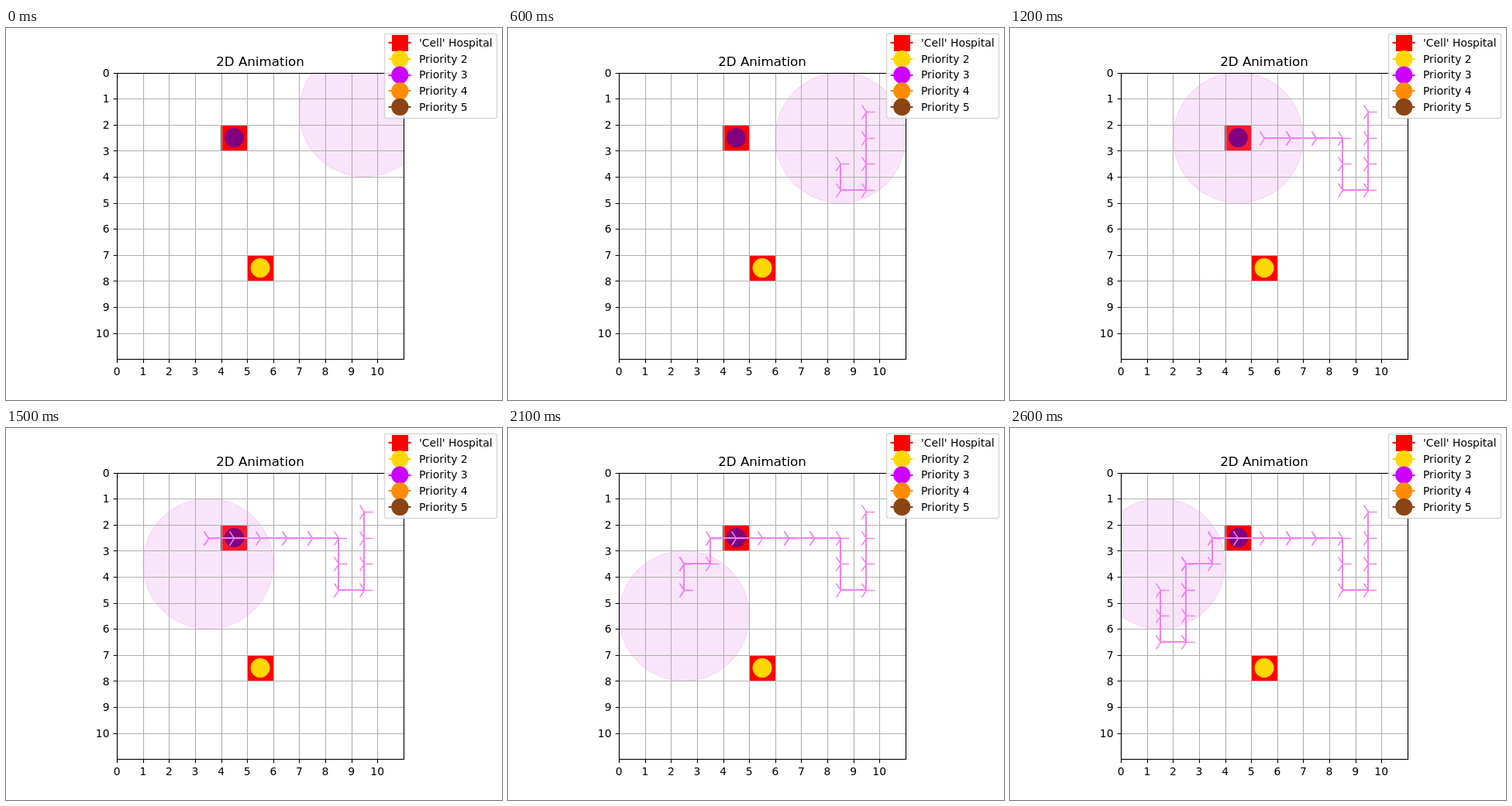
Recreate the animation shown at these times as an HTML page. Size 640 px wide and 480 px high, loop 2700 ms.

```html
<!DOCTYPE html>
<html lang="en">
<head>
<meta charset="utf-8">
<title>2D Animation</title>
<style>
  html, body { margin: 0; width: 100%; height: 100%; overflow: hidden; background: #fff; }
  svg { display: block; }
  text { font: 13.89px "DejaVu Sans", sans-serif; fill: #000; }
  .title { font-size: 16.67px; }
  .end { text-anchor: end; }
  .mid { text-anchor: middle; }
</style>
</head>
<body>
<svg id="stage" width="640" height="480" viewBox="0 0 640 480">
  <defs>
    <clipPath id="axes"><rect x="143.2" y="57.6" width="369.6" height="369.6"/></clipPath>
  </defs>
</svg>
<script>
const STEP = 100, CELL = 33.6, LEFT = 143.2, TOP = 57.6;
const stage = document.getElementById('stage');

function add(tag, attrs, parent = stage) {
  const el = document.createElementNS('http://www.w3.org/2000/svg', tag);
  for (const key in attrs) el.setAttribute(key, attrs[key]);
  parent.appendChild(el);
  return el;
}
function label(str, x, y, cls) {
  add('text', { x, y, class: cls || '' }).textContent = str;
}
const px = c => LEFT + CELL * c;
const py = c => TOP + CELL * c;
const snap = v => Math.round(v);

// One letter per step: direction of travel, or S to stay
const route = [[9, 1]];
const moves = { L: [-1, 0], R: [1, 0], U: [0, -1], D: [0, 1], S: [0, 0] };
for (const m of 'DDDLUULSLSLLLSDLDUSDDDLUUU') {
  const [x, y] = route[route.length - 1];
  route.push([x + moves[m][0], y + moves[m][1]]);
}
const points = route.map(([x, y]) => [px(x + 0.5), py(y + 0.5)]);

// Hospital cells and coverage disc
for (const [x, y] of [[4, 2], [5, 7]]) {
  add('rect', {
    x: snap(px(x)), y: snap(py(y)), width: snap(px(x + 1)) - snap(px(x)),
    height: snap(py(y + 1)) - snap(py(y)), fill: '#f00'
  });
}
const disc = add('circle', {
  r: 2.5 * CELL, fill: '#e17de1', stroke: '#e17de1', 'fill-opacity': 0.2,
  'stroke-opacity': 0.2, 'stroke-width': 1.39, 'clip-path': 'url(#axes)'
});

// Grid, ticks and tick labels
let grid = '', ticks = '';
for (let i = 0; i <= 10; i++) {
  const x = snap(px(i)) + 0.5, y = snap(py(i)) + 0.5;
  grid += `M${x} 58V427M143 ${y}H513`;
  ticks += `M${x} 427.5v4.86M143.5 ${y}h-4.86`;
  label(i, px(i), 448, 'mid');
  label(i, 133.5, py(i) + 5.2, 'end');
}
add('path', { d: grid, stroke: '#b0b0b0', 'stroke-width': 1.11 });
add('rect', { x: 277, y: 126, width: 1, height: 32, fill: '#3c4a4a' });

// Priority markers, then the trail
add('circle', { cx: px(4.5), cy: py(2.5), r: 12.5, fill: '#800080' });
add('circle', { cx: px(5.5), cy: py(7.5), r: 12.5, fill: '#ffd700' });
const trail = add('path', {
  fill: 'none', stroke: '#ee82ee', 'stroke-width': 2.08,
  'stroke-linejoin': 'round', 'stroke-linecap': 'square'
});
const marks = points.map(([x, y]) => {
  const c = `M${snap(x) + 0.5} ${snap(y) + 0.5}`;
  return add('path', {
    d: `${c}h11${c}l-6 -9${c}l-6 9`, fill: 'none', stroke: '#ee82ee', 'stroke-width': 1.39
  });
});

add('path', { d: ticks, stroke: '#000', 'stroke-width': 1.11 });
add('rect', {
  x: 143.5, y: 58.5, width: 370, height: 369, fill: 'none', stroke: '#000', 'stroke-width': 1.11
});
label('2D Animation', 328, 49, 'title mid');

// Legend
add('rect', {
  x: 488.5, y: 7.5, width: 145, height: 109, rx: 2.8, fill: '#fff', 'fill-opacity': 0.8,
  stroke: '#ccc', 'stroke-opacity': 0.8, 'stroke-width': 1.39
});
[["'Cell' Hospital", '#f00'], ['Priority 2', '#ffd700'], ['Priority 3', '#cc00ff'],
 ['Priority 4', '#ff8c00'], ['Priority 5', '#8b4513']].forEach(([name, fill], i) => {
  const y = 19.3 + 20.6 * i;
  add('path', { d: `M493.5 ${snap(y)}H522.5`, stroke: fill, 'stroke-width': 2.08 });
  if (i) add('circle', { cx: 508.3, cy: y + 0.2, r: 11.1, fill });
  else add('rect', { x: 498, y: 9, width: 21, height: 21, fill });
  label(name, 533, y + 4.86);
});

function draw(time) {
  const n = Math.floor(time / STEP) % points.length;
  disc.setAttribute('cx', points[n][0]);
  disc.setAttribute('cy', points[n][1]);
  const path = points.slice(0, n).map(([x, y]) => `${snap(x)} ${snap(y)}`);
  trail.setAttribute('d', n > 1 ? 'M' + path.join('L') : '');
  marks.forEach((m, i) => m.setAttribute('visibility', i < n ? 'visible' : 'hidden'));
}
function tick() {
  draw(performance.now());
  requestAnimationFrame(tick);
}
tick();
</script>
</body>
</html>
```
